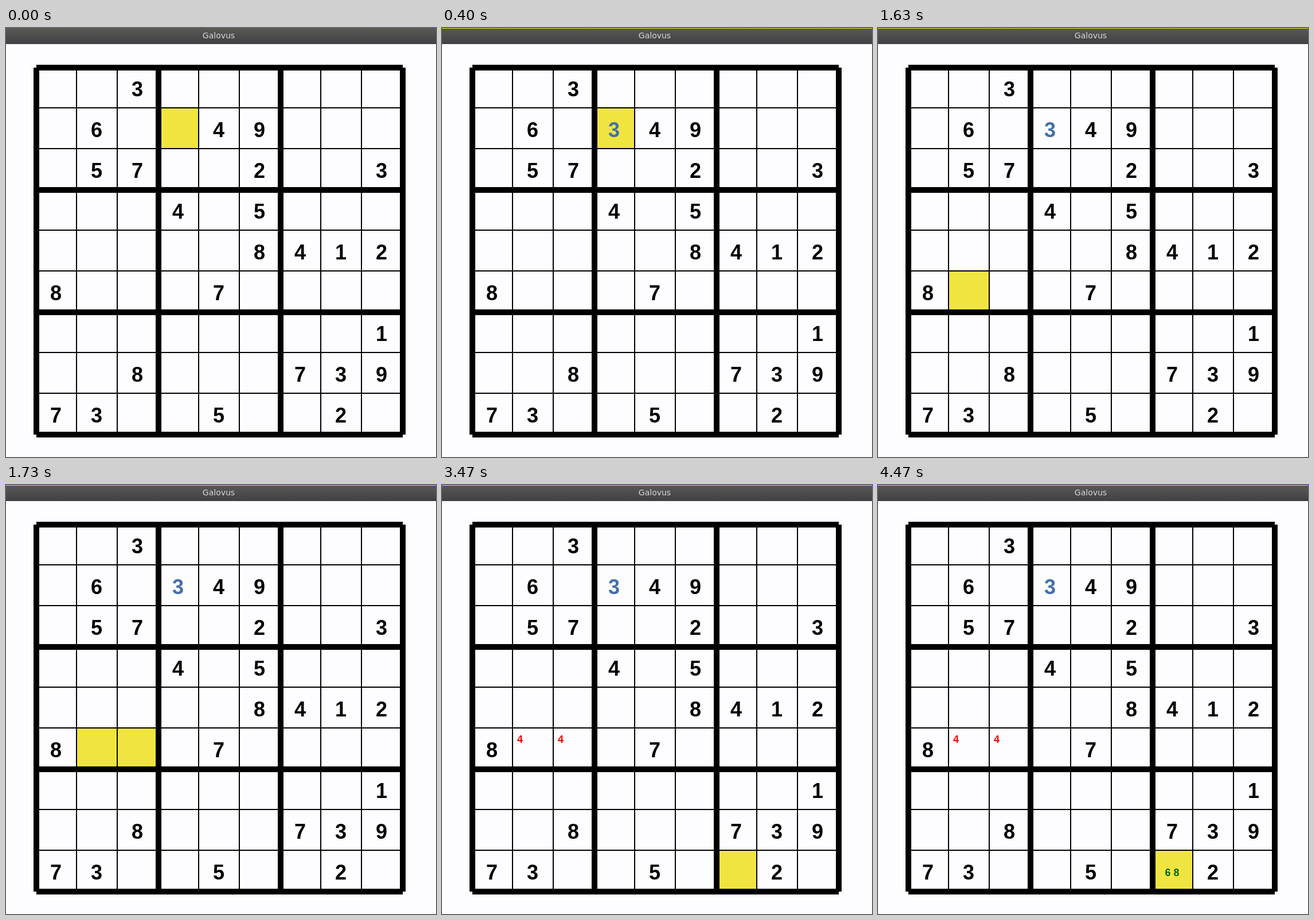
Recreate the animation shown at these times as an HTML page. Size 750 by 747 pixels, loop 6.93 s.

```html
<!DOCTYPE html>
<html lang="en">
<head>
<meta charset="utf-8">
<title>Galovus</title>
<style>
  html, body { margin: 0; width: 100%; height: 100%; overflow: hidden; background: #fdfdff; }
  svg { display: block; width: 750px; height: 747px; }
  text { text-anchor: middle; font: bold 36px "Liberation Sans", Arial, sans-serif; }
  .title { font: 14px "DejaVu Sans", sans-serif; fill: #d8d8d8; }
  .note { font-size: 18px; }
  .pick { fill: #f0e540; }
</style>
</head>
<body>
<svg id="stage" viewBox="0 0 750 747">
  <defs>
    <linearGradient id="bar" x2="0" y2="1">
      <stop offset="0" stop-color="#595955"/>
      <stop offset="1" stop-color="#403f44"/>
    </linearGradient>
  </defs>
  <rect width="750" height="747" fill="#fdfdff"/>
  <rect width="750" height="28" fill="url(#bar)"/>
  <text class="title" x="371" y="18">Galovus</text>
</svg>
<script>
const LOOP = 6930;
const LEFT = 53, TOP = 69, CELL = 71, SIZE = CELL * 9;
const GIVENS = [
  '..3......', '.6..49...', '.57..2..3',
  '...4.5...', '.....8412', '8...7....',
  '........1', '..8...739', '73..5..2.'
];

const stage = document.getElementById('stage');
const timed = [];

function add(tag, attrs, text = '') {
  const el = document.createElementNS('http://www.w3.org/2000/svg', tag);
  for (const key in attrs) el.setAttribute(key, attrs[key]);
  el.textContent = text;
  return stage.appendChild(el);
}

// Visible from start (inclusive) to end (exclusive), in ms
function during(start, end, el) {
  timed.push({ start, end, el });
}

const cellX = col => LEFT + col * CELL;
const cellY = row => TOP + row * CELL;

function pick(row, col, start, end) {
  during(start, end, add('rect', {
    class: 'pick', x: cellX(col) - 1, y: cellY(row) - 1, width: CELL, height: CELL
  }));
}

function digit(row, col, text, fill = '#000') {
  return add('text', { x: cellX(col) + 34, y: cellY(row) + 50, fill }, text);
}

function note(x, y, text, fill) {
  return add('text', { class: 'note', x, y, fill }, text);
}

// Thin lines sit one pixel up and left of the thick grid
function line(i) {
  const thick = i % 3 === 0, shift = thick ? 0 : 1;
  const x = cellX(i) - shift, y = cellY(i) - shift;
  add('path', {
    d: `M${x} ${TOP}v${SIZE}M${LEFT} ${y}h${SIZE}`,
    stroke: '#000', 'stroke-width': thick ? 10 : 2
  });
}

during(30, LOOP, add('rect', { width: 750, height: 1, fill: '#e6de1c' }));

pick(1, 3, 0, 1570);
pick(5, 1, 1570, 3470);
pick(5, 2, 1650, 3470);
pick(8, 6, 3470, LOOP);

for (let i = 0; i <= 9; i++) line(i);

GIVENS.forEach((cells, row) => [...cells].forEach((value, col) => {
  if (value !== '.') digit(row, col, value);
}));

during(370, LOOP, digit(1, 3, '3', '#4470aa'));
for (const col of [1, 2]) {
  during(2630, LOOP, note(cellX(col) + 12, 449, '4', '#fa0000'));
}
during(4400, 4435, note(513, 681, '6', '#006400'));
during(4435, LOOP, note(513, 681, '6 8', '#006400'));

const origin = performance.now();

function draw() {
  const t = (performance.now() - origin) % LOOP;
  for (const { start, end, el } of timed) {
    el.setAttribute('visibility', t >= start && t < end ? 'visible' : 'hidden');
  }
  requestAnimationFrame(draw);
}
draw();
</script>
</body>
</html>
```
